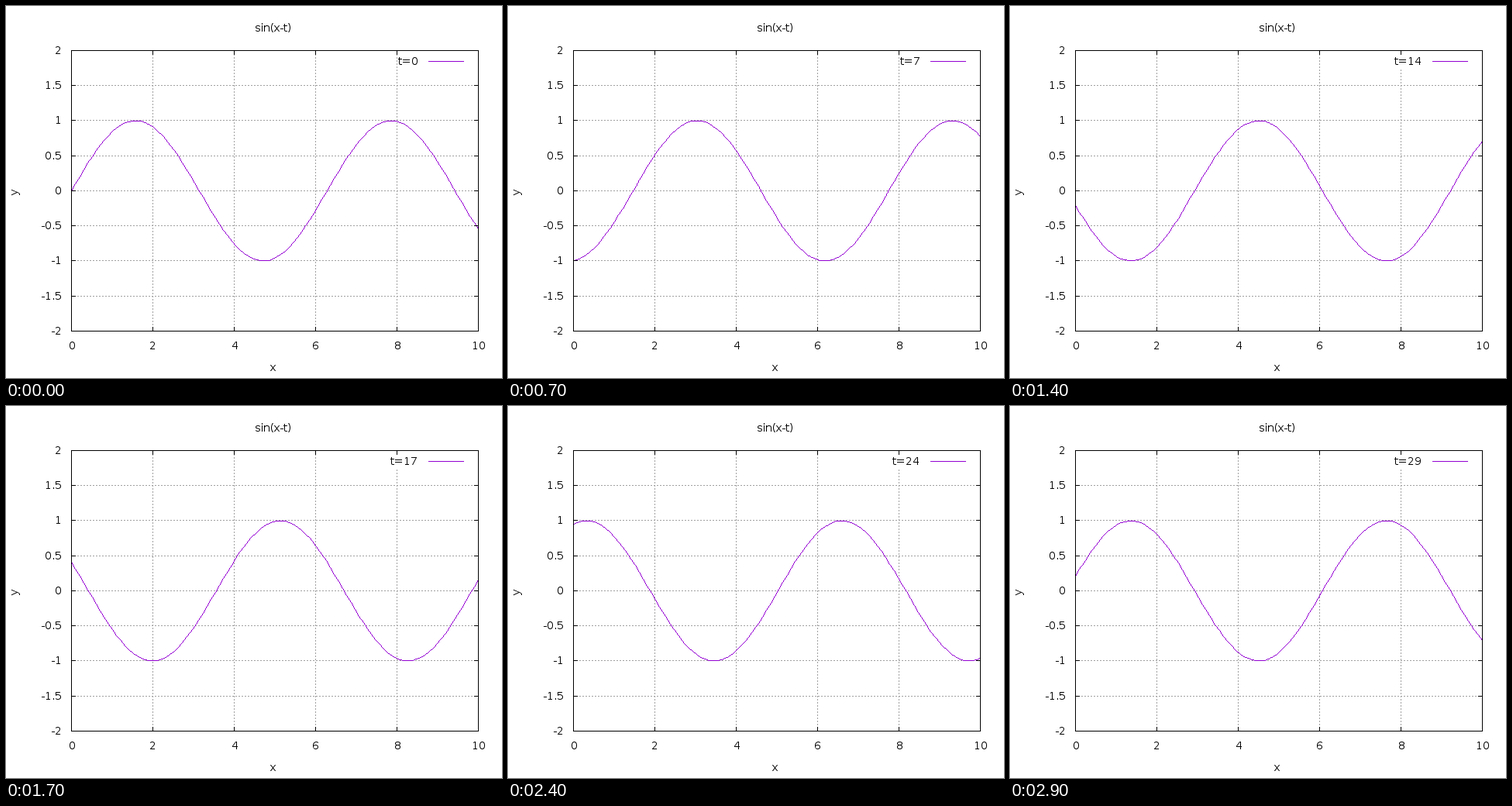
Write a matplotlib script that moves like this. It is 640 px wide and 480 px high and loops after 3 s.

```python
import numpy as np
import matplotlib.pyplot as plt
from matplotlib.animation import FuncAnimation

W, H, DPI = 640, 480, 100
PX = 72 / DPI  # one pixel in points
LEFT, RIGHT, TOP, BOTTOM = 84, 609, 57, 419
TIC = 5
FRAMES = 30
PURPLE = (0x94 / 255, 0, 0xD3 / 255)
GRID = "#a0a0a0"

plt.rcParams.update({
    "font.family": "DejaVu Sans",
    "font.size": 14 * PX,
    "text.hinting": "default",
    "text.hinting_factor": 1,
})

fig = plt.figure(figsize=(W / DPI, H / DPI), dpi=DPI, facecolor="white")
ax = fig.add_axes([0, 0, 1, 1])
ax.axis("off")


def col(x):
    return int(LEFT + x / 10 * (RIGHT - LEFT) + 0.5)


def row(y):
    up = (y + 2) / 4 * (BOTTOM - TOP)
    return BOTTOM - np.floor(up + 0.5).astype(int)


def stroke(x0, y0, x1, y1, color="black", z=4, **kw):
    """One pixel wide straight line."""
    line, = ax.plot([x0, x1], [y0, y1], color=color, lw=PX, zorder=z,
                    solid_capstyle="butt", dash_capstyle="butt",
                    snap=False, **kw)
    return line


def hline(x0, x1, y, **kw):
    return stroke(x0 - 0.5, y, x1 + 0.5, y, **kw)


def vline(x, y0, y1, **kw):
    return stroke(x, y1 + 0.5, x, y0 - 0.5, **kw)


def label(x, baseline, text, ha="center", **kw):
    return ax.text(x, baseline - 0.5, text, ha=ha, va="baseline",
                   zorder=5, **kw)


dots = dict(color=GRID, z=1, linestyle=(0, (2, 2)))

for v in np.arange(-2, 2.1, 0.5):
    y = row(v)
    if abs(v) < 2:
        hline(LEFT, RIGHT, y, **dots)
    hline(LEFT, LEFT + TIC, y)
    hline(RIGHT - TIC, RIGHT, y)
    label(71.5, y + 5, f"{v:g}", ha="right")

for v in range(0, 11, 2):
    x = col(v)
    if 0 < v < 10:
        grid_line = vline(x, TOP, BOTTOM, **dots)
    vline(x, TOP, TOP + TIC)
    vline(x, BOTTOM - TIC, BOTTOM)
    label(x + 0.5, 443, str(v))

hline(LEFT, RIGHT, TOP)
hline(LEFT, RIGHT, BOTTOM)
vline(LEFT, TOP, BOTTOM)
vline(RIGHT, TOP, BOTTOM)

label(344, 33, "sin(x-t)")
label(343.5, 471, "x")
ax.text(18.5, 240, "y", rotation=90, ha="right", va="center", zorder=5)

key = label(531, 76, "", ha="right")
hline(545, 590, 71, color=PURPLE)

xs = np.linspace(0, 10, 100)
cols = np.array([col(x) for x in xs])


def curve(n):
    """Crisp polyline through 100 samples, as an RGBA layer."""
    rows = row(np.sin(xs - 2 * np.pi * n / FRAMES))
    layer = np.zeros((H, W, 4))
    layer[..., :3] = PURPLE
    for x0, y0, x1, y1 in zip(cols, rows, cols[1:], rows[1:]):
        steps = max(abs(x1 - x0), abs(y1 - y0)) + 1
        px = np.rint(np.linspace(x0, x1, steps)).astype(int)
        py = np.rint(np.linspace(y0, y1, steps)).astype(int)
        layer[py, px, 3] = 1
    return layer


wave = ax.imshow(curve(0), interpolation="nearest", aspect="auto", zorder=2)
ax.set_xlim(-0.5, W - 0.5)
ax.set_ylim(H - 0.5, -0.5)


def update(n):
    wave.set_data(curve(n))
    key.set_text(f"t={n}")
    # a two-digit key reaches over the last grid line and interrupts it
    top = TOP if n < 10 else 81
    grid_line.set_ydata([BOTTOM + 0.5, top - 0.5])
    return wave, key, grid_line


anim = FuncAnimation(fig, update, frames=FRAMES, interval=100,
                     init_func=lambda: update(0), repeat=True)
plt.show()
```
